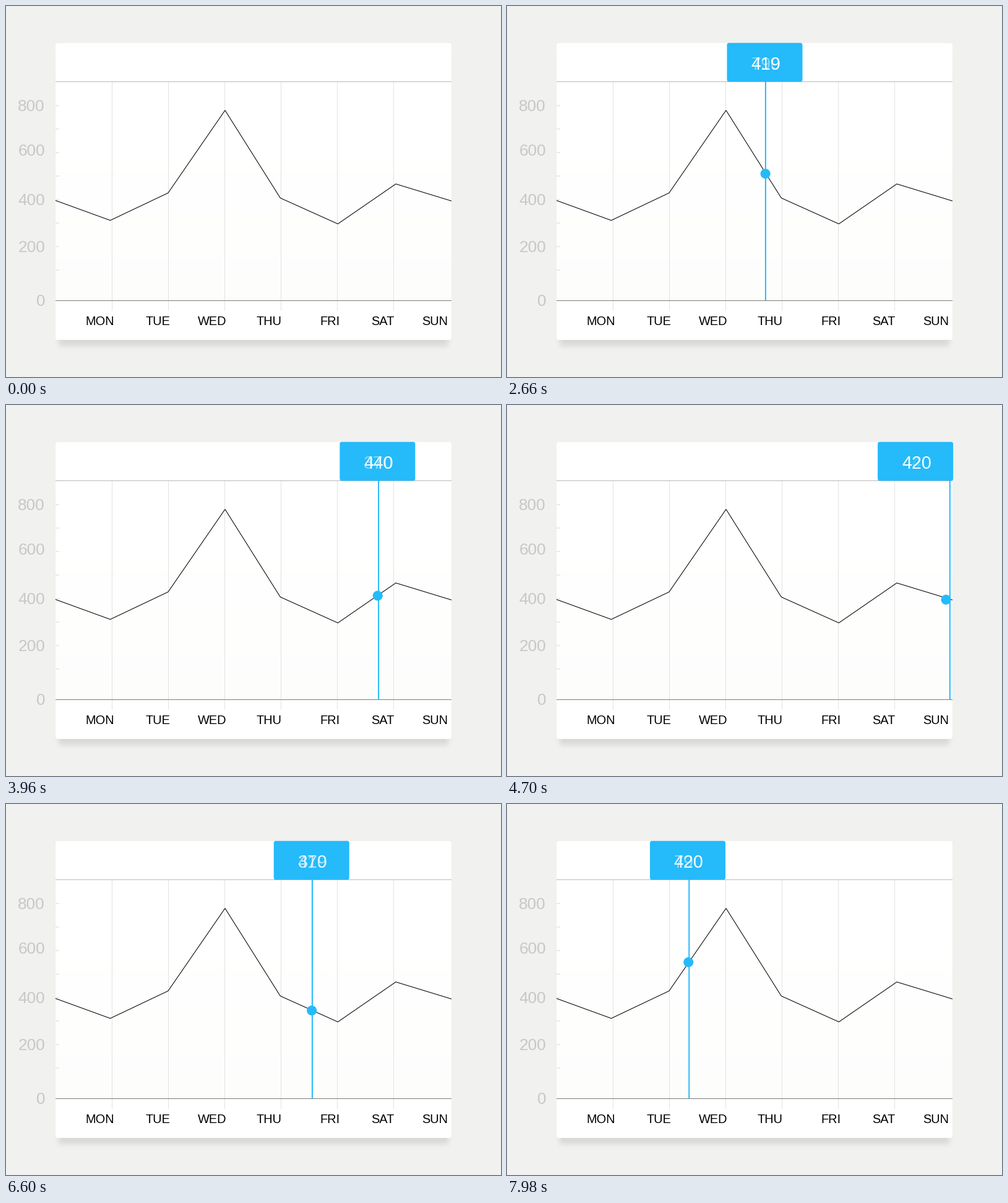
Animation of 800 by 600 pixels, one loop 8 s. Source, as a matplotlib script:

```python
import numpy as np
import matplotlib.pyplot as plt
from matplotlib.animation import FuncAnimation
from matplotlib.collections import LineCollection
from matplotlib.patches import Circle, FancyBboxPatch

W, H, DPI = 800, 600, 100
STEP, LOOP = 20, 8000
PX = 72 / DPI
BLUE = "#25bafa"
SANS = "Liberation Sans"
SHOW = 1700  # ms when the marker appears

fig = plt.figure(figsize=(W / DPI, H / DPI), dpi=DPI)
ax = fig.add_axes([0, 0, 1, 1])
ax.set_xlim(0, W)
ax.set_ylim(H, 0)
ax.axis("off")


def text(x, y, s, size, color, **kw):
    return ax.text(x, y, s, fontsize=size * PX, color=color, family=SANS,
                   va="baseline", **kw)


def lines(segments, color, width=1, z=2):
    ax.add_collection(LineCollection(segments, colors=color, snap=False,
                                     linewidths=width * PX, zorder=z))


def smooth(u):
    u = np.clip(u, 0, 1)
    return u * u * (3 - 2 * u)


def soft(v, lo, hi, blur=8):
    return smooth((v - lo + blur) / (2 * blur)) * smooth((hi + blur - v) / (2 * blur))


# Page, soft shadow and the rounded card with its faint lower tint
px, py = np.meshgrid(np.arange(W) + 0.5, np.arange(H) + 0.5)
shade = soft(px, 85, 715) * soft(py, 72, 550)
page = np.array([241, 241, 239]) * (1 - 0.1 * shade[..., None])
tint = np.clip((py - 200) / 276, 0, 1) * (py < 476)
card = 255 - tint[..., None] * np.array([2, 2, 3])
corner = np.hypot(np.maximum(abs(px - 400) - 316, 0), np.maximum(abs(py - 300) - 236, 0))
mask = np.clip(4.5 - corner, 0, 1)[..., None]
page = page * (1 - mask) + card * mask
fig.figimage(page.round().astype(np.uint8), origin="upper", zorder=-1)

# Grid and axes
lines([[(171.5 + 91 * i, 123), (171.5 + 91 * i, 493)] for i in range(6)], "#e2e2e0")
lines([[(80, 161 + 38 * i), (86, 161 + 38 * i)] for i in range(8)], "#d8d8d8")
lines([[(80, 122.5), (720, 122.5)]], "#b9b9b9")
lines([[(80, 476.5), (720, 476.5)]], "#7c7c7c")

for value, y in zip((800, 600, 400, 200, 0), (170, 242.5, 322.5, 398.5, 485)):
    text(63, y, str(value), 26.3, "#c8c8c8", ha="right")

days = ("MON", "TUE", "WED", "THU", "FRI", "SAT", "SUN")
for day, x in zip(days, (152, 245, 333, 424.7, 523.5, 608.7, 693.5)):
    text(x, 516.5, day, 20, "black", ha="center")

curve_x = [80, 168.5, 262, 354, 443.3, 536.3, 630, 720]
curve_y = [314.5, 346.7, 302.3, 168.7, 310.5, 352.4, 287.8, 315.3]
ax.plot(curve_x, curve_y, color="black", lw=1.05 * PX, zorder=3, snap=False,
        solid_joinstyle="miter", solid_capstyle="butt")

# Stops of the marker, Tuesday to Sunday
stops = np.arange(6)
dot_x = np.array([261.3, 355.3, 444, 536.5, 630.5, 720.3])
dot_y = np.array([297.5, 175, 312, 352.5, 288, 318.5])
line_x = np.array([263, 355, 444.5, 537.5, 632, 719.7])
tip_x = np.array([260.4, 353.4, 443.2, 536.4, 630, 661.5])
values = ("420", "790", "419", "370", "440", "420")
dist = np.r_[0, np.cumsum(np.hypot(np.diff(dot_x), np.diff(dot_y)))]

# Travel along the curve: out to Sunday, then back
key_t = np.array([1700, 1940, 3280, 4700, 4960, 5980, 7240, 7980])
key_s = np.interp([1, 1.164, 2.398, 4.88, 5, 3.707, 1.418, 0.34], stops, dist)
key_v = np.gradient(key_s, key_t)
key_v[4] = 0


def travel(t):
    i = int(np.clip(np.searchsorted(key_t, t, side="right") - 1, 0, len(key_t) - 2))
    span = key_t[i + 1] - key_t[i]
    u = (t - key_t[i]) / span
    ease = smooth(u)
    s = (key_s[i] * (1 - ease) + key_s[i + 1] * ease
         + span * u * (1 - u) * ((1 - u) * key_v[i] - u * key_v[i + 1]))
    return np.interp(s, dist, stops)


tip = ax.add_patch(FancyBboxPatch((0, 59.7), 122, 62.8, fc=BLUE, ec="none", zorder=5,
                                  boxstyle="round,pad=0,rounding_size=3.5"))
(stem,) = ax.plot([0, 0], [122, 476], color=BLUE, lw=2 * PX, zorder=4,
                  snap=False, solid_capstyle="butt")
dot = ax.add_patch(Circle((0, 0), 8, fc=BLUE, ec="none", zorder=6))
labels = [text(0, 103, v, 28.6, "white", ha="center", zorder=7) for v in values]
marker = [tip, stem, dot, *labels]


def draw(frame):
    t = frame * STEP
    for part in marker:
        part.set_visible(t >= SHOW)
    if t < SHOW:
        return marker

    fade = 1 - (1 - min((t - SHOW) / 300, 1)) ** 2
    pos = travel(t)
    # Tooltip and stem run ahead of the dot on the way to Sunday
    lead = 5 - (5 - pos) ** 1.47 if pos > 4 else pos

    center = np.interp(lead, stops, tip_x)
    x = np.interp(lead, stops, line_x)
    tip.set_x(center - 61)
    stem.set_xdata([x, x])
    dot.center = np.interp(pos, stops, dot_x), np.interp(pos, stops, dot_y)
    for part in (tip, stem, dot):
        part.set_alpha(fade)

    for i, label in enumerate(labels):
        alpha = float(np.clip(1.4 * (1 - abs(pos - i)), 0, 1))
        label.set_visible(alpha > 0.01)
        label.set_alpha(alpha * fade)
        label.set_x(center + 1.7)
    return marker


anim = FuncAnimation(fig, draw, frames=LOOP // STEP, interval=STEP,
                     repeat=True, repeat_delay=0, blit=False)
plt.show()
```
